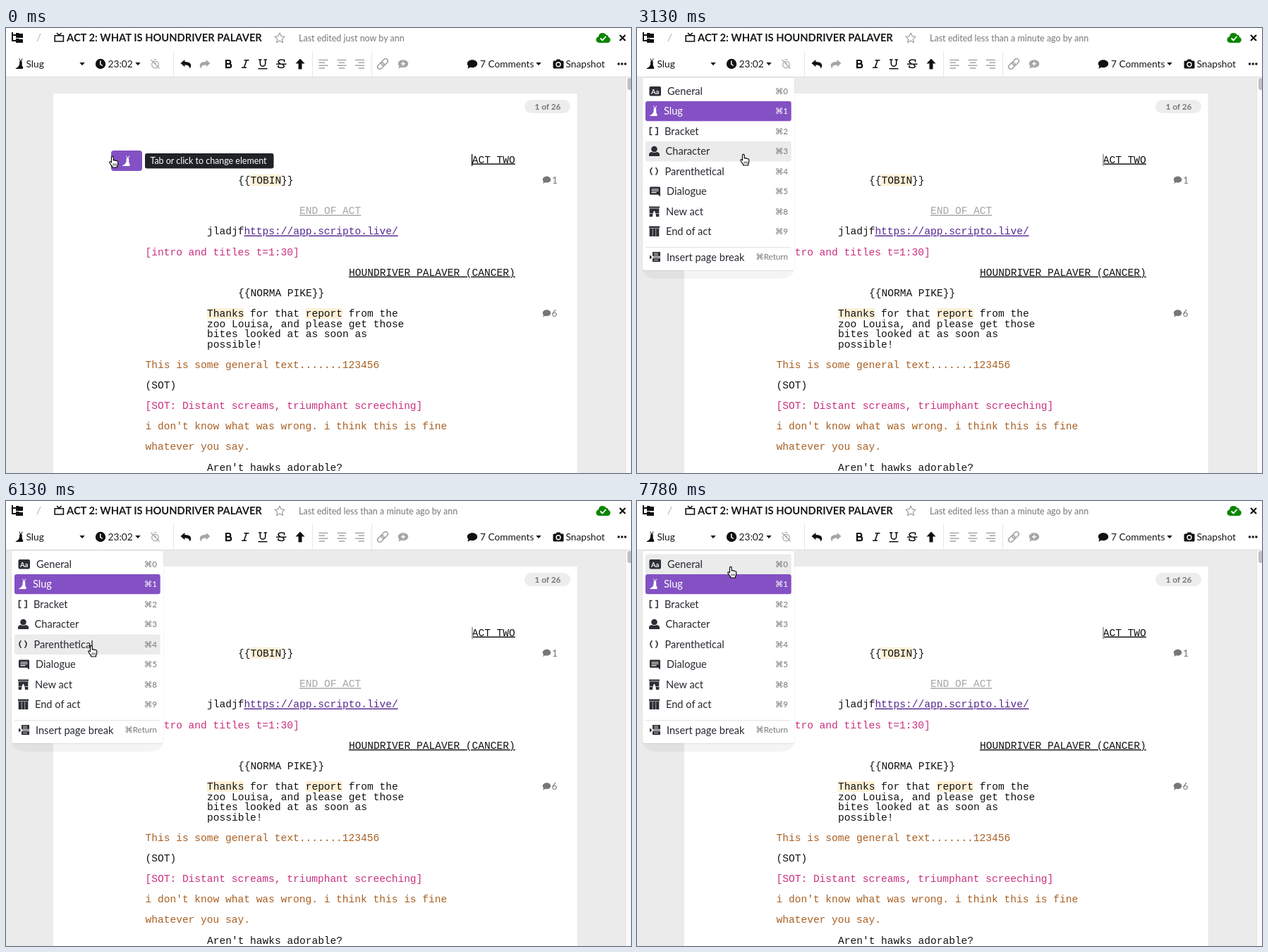
An HTML page that plays this animation: 886 by 632 pixels, repeating every 8 s.

```html
<!DOCTYPE html>
<html lang="en">
<head>
<meta charset="utf-8">
<title>Script editor</title>
<style>
  html, body { margin: 0; width: 886px; height: 632px; overflow: hidden; background: #fff; }
  svg { display: block; }
  text { font: 13.7px Lato, sans-serif; fill: #17181b; white-space: pre; }
  .title { font-size: 14.7px; font-weight: 700; }
  .edited { font-size: 12.5px; fill: #777; }
  .tip { font-size: 12.45px; fill: #fff; }
  .pages { font-size: 11.8px; font-weight: 700; fill: #777; }
  .count { fill: #777; }
  .item { font-size: 14.6px; fill: #25282e; }
  .key { font-size: 11.6px; fill: #777; text-anchor: end; font-family: Lato, "DejaVu Sans", sans-serif; }
  .aa { font-size: 9.5px; font-weight: 700; fill: #fff; }
  #script text { font: 14.55px "Liberation Mono", monospace; }
  .line { fill: none; stroke: currentColor; stroke-width: 1.6; }
  .thin { stroke-width: 1.2; }
  .bold { stroke-width: 2.2; }
  .dim { color: #a5a5a5; }
  use, .icon { fill: currentColor; }
</style>
</head>
<body>
<svg width="886" height="632" viewBox="0 0 886 632" color="#111">
  <defs>
    <g id="slug">
      <path d="M-6.3 6.2Q-.8 4.5-.8-1.5Q-1.2-4.6 1.1-4.5Q3.2-4 2.7-.5Q2.2 2.5 3.9 4.6Q5 7 3 7H-5.6Q-7 6.9-6.3 6.2z"/>
      <path d="M.5-4L-1-7.5M1.8-4L3-7.5" stroke="currentColor"/>
    </g>
    <path id="drop" d="M-3.7-2H3.7L0 2.3z"/>
    <path id="bubble" d="M0-5.8C4-5.8 7.2-3.4 7.2-.3S4 5.2 0 5.2Q-1.6 5.2-3 4.8Q-4.8 6.4-7 6.4Q-5.8 5-5.6 3.3Q-7.2 1.6-7.2-.3C-7.2-3.4-4-5.8 0-5.8z"/>
    <path id="undo" d="M-7.5-1L-1.6-6V-3C4-3 7.3-1.2 7.3 2.4Q7.3 4.6 5.2 6.4Q5.8 1.4-1.6 1.4V4.2z"/>
  </defs>

  <!-- workspace and page -->
  <path fill="#ebebeb" d="M0 70H886V632H0z"/>
  <path fill="#fff" d="M67 93H809.5V632H67z"/>
  <path fill="#fafafa" d="M879 70H886V632H879z"/>
  <path stroke="#e4e4e4" d="M878.5 70V632"/>
  <rect x="881" y="71" width="8" height="17" rx="3" fill="#c1c1c1"/>
  <rect x="735" y="102" width="65" height="19" rx="9.5" fill="#ededed"/>
  <text class="pages" x="749.5" y="116">1 of 26</text>

  <path fill="#fdf0d5" d="M346 208h44v16h-44zM285 398h52v15h-52zM425 398h52v15h-52z"/>
  <g id="script"></g>
  <g color="#777">
    <use href="#bubble" transform="translate(766.5 215.5) scale(.8)"/>
    <use href="#bubble" transform="translate(766.5 405) scale(.8)"/>
  </g>
  <text class="count" x="774" y="220.5">1</text>
  <text class="count" x="773.5" y="410">6</text>
  <rect id="caret" x="660" y="179" height="17"/>

  <!-- title bar -->
  <path class="icon" d="M8 6h2v3h4V7h4l1 1h5v6h-10v-3h-4v6h4v-2h4l1 1h5v5h-10v-2h-6z"/>
  <path stroke="#aaa" d="M44 19L49 8"/>
  <path class="line" d="M69.2 10.8h12.2v8.2H69.2zM72 7l3.3 3.4L78.6 7"/>
  <text class="title" x="86" y="19">ACT 2: WHAT IS HOUNDRIVER PALAVER</text>
  <path fill="none" stroke="#999" stroke-width="1.1" stroke-linejoin="round" d="M388 7l2.1 4.6 5 .6-3.7 3.4 1 5-4.4-2.5-4.4 2.5 1-5-3.7-3.4 5-.6z"/>
  <text class="edited" id="edited" x="415" y="18.5"></text>
  <path fill="#0b8500" d="M841 21Q836.5 20.5 836.5 16.5Q836.7 13 840 12.3Q840.5 7 845.5 7Q849.5 7 851 10Q854 9.8 854 13Q857 14 856.7 17Q856.3 21 852.5 21z"/>
  <path fill="none" stroke="#fff" stroke-width="1.8" d="M842.5 14.5l3 3 5-5.5"/>
  <path class="line bold" d="M870 10l8 8m0-8l-8 8"/>

  <!-- toolbar -->
  <path stroke="#e6e6e6" d="M237.5 33V69M434.5 33V69M518.5 33V69"/>
  <path stroke="#dcdcdc" d="M0 69.5H886"/>
  <use href="#slug" transform="translate(20 51)"/>
  <text x="28.5" y="55.5">Slug</text>
  <use href="#drop" x="108" y="51"/>
  <circle class="icon" cx="134" cy="51" r="7.2"/>
  <path fill="none" stroke="#fff" stroke-width="1.5" d="M133.8 46.5V51.5L136.8 53.5"/>
  <text x="144.5" y="55.5">23:02</text>
  <use href="#drop" x="187" y="51"/>
  <g class="dim">
    <circle class="line thin" cx="211.5" cy="52" r="4.8"/>
    <path class="line thin" d="M205.5 45L217.5 57.5M209.5 44.5h4M211.5 49v3"/>
  </g>
  <use href="#undo" x="255" y="51"/>
  <use class="dim" href="#undo" transform="translate(282 51) scale(-1 1)"/>
  <path class="line bold" d="M312 46h3.8a2.4 2.4 0 0 1 0 4.8H312h4.5a2.7 2.7 0 0 1 0 5.4H312V45"/>
  <path class="line" d="M337.5 45.8h7M334 56.2h7M341 46L337.5 56"/>
  <path class="line" d="M358 45h4.5M365.5 45h4.5M360.3 45V50.5a3.7 3.7 0 0 0 7.4 0V45M357.5 57.7h13"/>
  <path class="line" d="M383 51.3h14.5M394.5 48.5V45.5Q387 44 386 47.5Q386 49.5 389 50.5M392 52Q395 53.5 394 55.2Q392 57.5 386 55.7V53"/>
  <path class="icon" d="M417 43.5L423.5 50.5H419.5V58.5H414.5V50.5H410.5z"/>
  <g class="dim">
    <path class="line" d="M443.5 45.5h13M443.5 49.3h8.5M443.5 53.2h13M443.5 57h8.5
      M469.5 45.5h13M471.8 49.3h8.5M469.5 53.2h13M471.8 57h8.5
      M495 45.5h13M499.5 49.3h8.5M495 53.2h13M499.5 57h8.5"/>
    <g class="line" transform="translate(534 51) rotate(-45)">
      <rect x="-9" y="-3.2" width="10.5" height="6.4" rx="3.2"/>
      <rect x="-1.5" y="-3.2" width="10.5" height="6.4" rx="3.2"/>
    </g>
    <use href="#bubble" x="563" y="51"/>
  </g>
  <path stroke="#fff" stroke-width="1.5" d="M560 50.7h6M563 47.7v6"/>
  <use href="#bubble" x="661" y="51"/>
  <text x="672" y="55.5">7 Comments</text>
  <use href="#drop" x="755" y="51"/>
  <path class="icon" d="M777 46.5h2.5l1.2-2h4.6l1.2 2h2.5q1.5 0 1.5 1.5v8q0 1.5-1.5 1.5h-12q-1.5 0-1.5-1.5v-8q0-1.5 1.5-1.5z"/>
  <circle cx="783" cy="51.8" r="3" fill="none" stroke="#fff" stroke-width="1.4"/>
  <text x="793.5" y="55.5">Snapshot</text>
  <path class="icon" d="M867 49.5h3v3h-3zM871.7 49.5h3v3h-3zM876.4 49.5h3v3h-3z"/>

  <!-- element button with tooltip -->
  <g id="hint">
    <rect x="149" y="174" width="44" height="29" rx="4" fill="#8351c3"/>
    <use href="#slug" color="#fff" transform="translate(171.5 189)"/>
    <rect x="197" y="178" width="182.5" height="21.5" rx="3" fill="#202227"/>
    <text class="tip" x="204.5" y="193">Tab or click to change element</text>
  </g>

  <!-- element menu -->
  <g id="menu" color="#2b2e35">
    <rect x="8" y="316" width="215" height="40" rx="20" ry="14" fill="#000" opacity=".045"/>
    <rect x="7.5" y="71" width="216" height="274" rx="4" fill="#000" opacity=".07"/>
    <rect x="8" y="71" width="215" height="273" rx="3" fill="#fff"/>
    <rect id="hover" x="12" width="206.7" height="28.5" rx="3" fill="#ebebeb"/>
    <rect x="12" y="104" width="206.7" height="28.3" rx="3" fill="#8351c3"/>
    <path stroke="#e2e2e2" d="M12 311.5H218"/>
    <g id="items"></g>
    <rect class="icon" x="17.5" y="83" width="16.5" height="13.5" rx="2"/>
    <text class="aa" x="20" y="93.5">Aa</text>
    <use href="#slug" color="#fff" transform="translate(24.5 118)"/>
    <path class="line" d="M21.5 141.5h-3v10h3M26 141.5h3v10h-3"/>
    <circle class="icon" cx="24.5" cy="172" r="4.3"/>
    <path class="icon" d="M17 182v-2.5q0-3 4-3.5q3.5 1.8 7 0q4 .5 4 3.5V182z"/>
    <path class="line" d="M21.5 198.3q-5 5 0 10.4M26.5 198.3q5 5 0 10.4"/>
    <path class="icon" d="M19.5 225.5H31.5q1.5 0 1.5 1.5V239.5l-3-2.7H19.5q-1.500 0-1.500-1.500V227q0-1.500 1.500-1.500z"/>
    <path stroke="#fff" stroke-width="1.1" d="M20.500 229h10M20.500 231.300h10M20.500 233.600h7"/>
    <path class="icon" d="M17 253.500h15v2h-.7V268H27Q27 262 24.500 259.500Q22 262 22 268H17.700V255.500H17z"/>
    <path stroke="#fff" stroke-width=".7" d="M18 256h13M17.700 263.500h4M27.300 263.500h4"/>
    <path class="icon" d="M17 281.500h15v2.500h-.7v12H17.700v-12H17z"/>
    <path stroke="#fff" stroke-width=".6" d="M18 284.300h13M22.300 285v11M26.700 285v11"/>
    <path class="icon" d="M22 318h11v6H22zM22 327h11v5H22zM18 322.500l3.500 3-3.500 3zM23 325h10v1H23z"/>
    <path stroke="#fff" stroke-width=".8" d="M24 320h6M24 322.300h6M24 329.500h6"/>
  </g>

  <g id="hand" stroke="#000" stroke-width="1.1" stroke-linejoin="round">
    <path fill="#fff" d="M-3.600 1V-6.200a1.400 1.400 0 0 1 2.800 0V-2q1.300-.8 2.300.3q1.300-.6 2.200.5q1.900-.4 2 1.200V3q0 2-1.200 3.200V8H-2.500V6.500Q-4 5-6 1.500q-.6-1.500.6-1.700q1-.1 1.800 1.200z"/>
    <path fill="none" stroke-width=".8" d="M-.9 2.500v3M1.200 2.500v3M3.200 2.500v3"/>
  </g>
</svg>
<script>
const $ = id => document.getElementById(id);

function addText(parent, x, y, str, attrs) {
  const el = document.createElementNS('http://www.w3.org/2000/svg', 'text');
  for (const [k, v] of Object.entries({ x, y, ...attrs })) el.setAttribute(k, v);
  el.textContent = str;
  $(parent).append(el);
}

const ink = '#111', pink = '#c8307f', brown = '#a96023';
// line number, x, colour, text, underlined
const lines = [
  [0, 660.7, ink, 'ACT TWO', 1],
  [2, 329, ink, '{{TOBIN}}'],
  [5, 416, '#a6a6a6', 'END OF ACT', 1],
  [7, 285, ink, 'jladjf'],
  [7, 337.4, '#55268f', 'https://app.scripto.live/', 1],
  [9, 197.5, pink, '[intro and titles t=1:30]'],
  [11, 486, ink, 'HOUNDRIVER PALAVER (CANCER)', 1],
  [13, 329, ink, '{{NORMA PIKE}}'],
  [15, 285, ink, 'Thanks for that report from the'],
  [16, 285, ink, 'zoo Louisa, and please get those'],
  [17, 285, ink, 'bites looked at as soon as'],
  [18, 285, ink, 'possible!'],
  [20, 197.5, brown, 'This is some general text.......123456'],
  [22, 197.5, ink, '(SOT)'],
  [24, 197.5, pink, '[SOT: Distant screams, triumphant screeching]'],
  [26, 197.5, brown, "i don't know what was wrong. i think this is fine"],
  [28, 197.5, brown, 'whatever you say.'],
  [30, 285, ink, "Aren't hawks adorable?"],
];
for (const [n, x, color, str, under] of lines)
  addText('script', x, 191.5 + n * 14.57, str,
    { style: `fill:${color};text-decoration:${under ? 'underline' : 'none'}` });

const rowHeight = 28.5, firstRow = 75.5;
const items = [
  ['General', 43, '0'], ['Slug', 38, '1'], ['Bracket', 39, '2'],
  ['Character', 40.5, '3'], ['Parenthetical', 39.5, '4'], ['Dialogue', 42, '5'],
  ['New act', 41, '8'], ['End of act', 41, '9'], ['Insert page break', 42, 'Return'],
];
items.forEach(([label, x, key], i) => {
  const y = i < 8 ? 94.8 + i * rowHeight : 330.5;
  const style = i === 1 ? 'fill:#fff' : '';
  addText('items', x, y, label, { class: 'item', style });
  addText('items', 214, y - 1.3, '⌘' + key, { class: 'key', style });
});

const OPEN = 3130;
const blinks = [440, 1040, 1480, 1930, 2530];
// time, x, y
const path = [
  [0, 153, 190], [150, 153, 189], [300, 152, 188], [440, 152, 187],
  [3130, 153, 187], [3580, 152, 183], [3730, 147, 172], [3880, 140, 162],
  [4330, 139, 160], [4480, 137, 164], [4630, 134, 172], [4780, 132, 180],
  [4930, 130, 187], [5080, 126, 203], [5230, 123, 215], [5380, 123, 216],
  [6130, 123, 213], [6280, 124, 202], [6430, 125, 186], [6580, 126, 172],
  [6730, 127, 163], [6880, 128, 155], [7030, 129, 151], [7180, 130, 148],
  [7330, 130, 140], [7480, 131, 126], [7630, 133, 112], [7780, 135, 101],
];
const show = (id, on) => $(id).setAttribute('visibility', on ? 'visible' : 'hidden');

function draw() {
  const t = performance.now() % 8000, open = t >= OPEN;
  const [, x, y] = path.findLast(p => p[0] <= t);
  $('hand').setAttribute('transform', `translate(${x} ${y})`);
  const row = Math.floor((y - 7 - firstRow) / rowHeight);
  $('hover').setAttribute('y', firstRow + row * rowHeight);
  show('menu', open);
  show('hint', !open);
  show('caret', open || blinks.filter(b => b <= t).length % 2 === 0);
  $('caret').setAttribute('width', open ? 2 : 1.2);
  $('caret').setAttribute('fill', open ? '#aaa' : '#000');
  $('edited').textContent = `Last edited ${t < 1780 ? 'just now' : 'less than a minute ago'} by ann`;
  requestAnimationFrame(draw);
}
draw();
</script>
</body>
</html>
```
